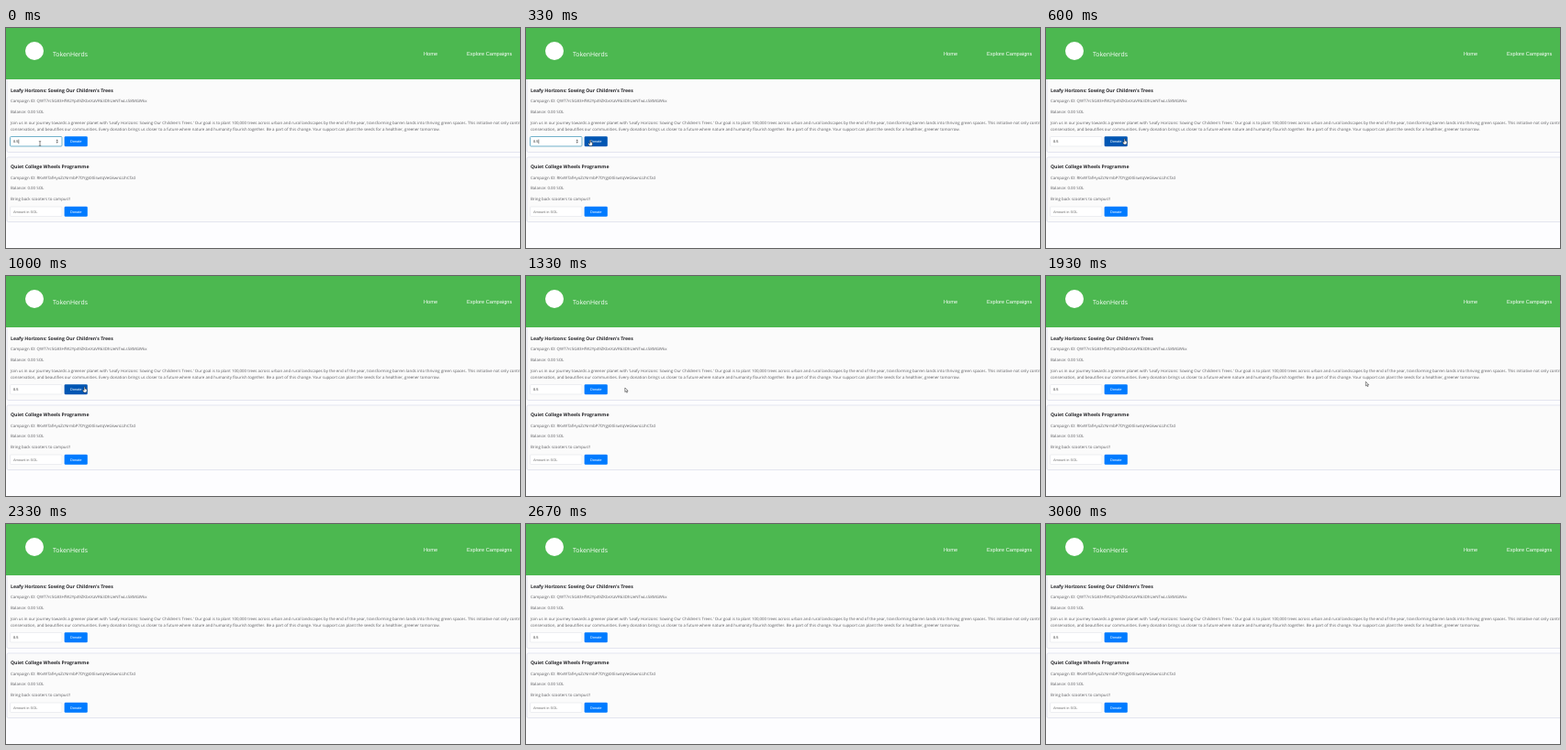
Write an HTML page that moves like this. It is 560 px wide and 240 px high and loops after 3070 ms.

```html
<!DOCTYPE html>
<html lang="en">
<head>
<meta charset="utf-8">
<title>Crowdfunding page</title>
<style>
  html, body { margin: 0; width: 100%; height: 100%; overflow: hidden; background: #fdfdff; }
  svg { display: block; width: 560px; height: 240px; }
  text { font: 4.4px "Open Sans", "Noto Sans", sans-serif; fill: #5c5c60; white-space: pre; text-rendering: geometricPrecision; }
  .title { font-size: 5.15px; font-weight: 700; fill: #26262a; }
  .brand { font-size: 6.85px; fill: #fff; }
  .nav { font: 5.65px "Liberation Sans", Arial, sans-serif; fill: #fff; }
  .control { font: 3.9px "Liberation Sans", Arial, sans-serif; fill: #707070; }
  .value { fill: #222; }
  .label { fill: #fff; text-anchor: middle; }
  .card { fill: #fbfbfb; stroke: #d9dcea; stroke-width: .7; }
  .field { fill: #fff; stroke: #e2e5ea; stroke-width: .6; }
  .field.focused { stroke: #62a9c4; stroke-width: .9; }
  .button { fill: #007bff; }
  .button.hovered { fill: #0056b3; }
</style>
</head>
<body>
<svg id="stage" viewBox="0 0 560 240" xmlns="http://www.w3.org/2000/svg"></svg>
<script>
const LOOP = 3070;
const STEP = 200 / 3;
const BLUR_AT = 520;
const EXIT_AT = 2260;
const stage = document.getElementById("stage");

// Pointer hot spot over time: [ms, x, y]
const path = [
  [0, 37, 126], [130, 37, 126], [430, 85.6, 121], [1130, 85.6, 121],
  [1330, 106.5, 122], [1930, 346.5, 115.5], [EXIT_AT, 530, 96]
];

function add(tag, attrs, parent = stage) {
  const node = document.createElementNS("http://www.w3.org/2000/svg", tag);
  for (const key in attrs) node.setAttribute(key, attrs[key]);
  parent.appendChild(node);
  return node;
}

function write(x, y, content, cls = "body") {
  add("text", { x, y, class: cls }).textContent = content;
}

function card(y, height) {
  add("rect", { x: 1, y, width: 570, height, rx: 1.5, class: "card" });
}

function donateForm(y, content, cls) {
  const field = add("rect", { x: 4.5, y, width: 56.5, height: 10.5, rx: 1, class: "field" });
  const button = add("rect", { x: 63.6, y: y - 0.2, width: 25.2, height: 10.9, rx: 1.3, class: "button" });
  write(8, y + 6.5, content, "control " + cls);
  write(76.2, y + 6.5, "Donate", "control label");
  return { field, button };
}

add("rect", { width: 560, height: 240, fill: "#fdfdff" });
card(54, 81.5);
card(141, 70.5);
add("rect", { width: 560, height: 56, fill: "#4cb850" });
add("circle", { cx: 31, cy: 25, r: 10, fill: "#fff" });
write(51, 30.8, "TokenHerds", "brand");
write(455, 30, "Home", "nav");
write(502, 30, "Explore Campaigns", "nav");

write(5, 69.5, "Leafy Horizons: Sowing Our Children's Trees", "title");
write(5, 80.7, "Campaign ID: QWT7rc5G83HfW2Yp49ZKbnXaVR63DhUeNTwLs58MGWkx");
write(5, 92.6, "Balance: 0.00 SOL");
write(5, 104.6, "Join us in our journey towards a greener planet with 'Leafy Horizons: Sowing Our Children's Trees.' " +
  "Our goal is to plant 100,000 trees across urban and rural landscapes by the end of the year, " +
  "transforming barren lands into thriving green spaces. This initiative not only contributes to");
write(5, 111.6, "conservation, and beautifies our communities. Every donation brings us closer to a future where " +
  "nature and humanity flourish together. Be a part of this change. Your support can plant the seeds " +
  "for a healthier, greener tomorrow.");
const form = donateForm(118.5, "0.5", "value");

write(5, 153.4, "Quiet College Wheels Programme", "title");
write(5, 164.7, "Campaign ID: RKvWTafHyoZcNrmbP7DYgJ4XEswtqVeGkwnLUhCfzd");
write(5, 176.4, "Balance: 0.00 SOL");
write(5, 188, "Bring back scooters to campus!!");
donateForm(195, "Amount in SOL", "placeholder");

// Editing marks shown while the first field has focus
const editing = add("g", {});
add("path", { d: "M13.8 121.5v4.8", stroke: "#222", "stroke-width": .5 }, editing);
add("path", { d: "M54.5 123.2l1.2-1.6 1.2 1.6zM54.5 124.2l1.2 1.6 1.2-1.6z", fill: "#555" }, editing);

const ink = { stroke: "#222", "stroke-width": .5, fill: "#fff", "stroke-linejoin": "round" };
const pointers = {
  beam: add("path", { ...ink, fill: "none", d: "M-1.2-2.3H1.2M0-2.3V2.3M-1.2 2.3H1.2" }),
  arrow: add("path", { ...ink, d: "M0 0V4.6L1.1 3.6 1.9 5.3 2.7 4.9 1.9 3.3H3.3Z" }),
  hand: add("path", { ...ink, d: "M-.5 0Q0-.5.5 0V2L2.5 2.6V4.6L1.8 6H-.8L-2.2 3.6-1.5 3.1-.5 3.9Z" })
};

function pointerAt(t) {
  const i = Math.max(1, path.findIndex(p => p[0] >= t));
  const [t0, x0, y0] = path[i - 1];
  const [t1, x1, y1] = path[i];
  const k = (t - t0) / (t1 - t0);
  return [x0 + (x1 - x0) * k, y0 + (y1 - y0) * k];
}

function render(time) {
  const t = Math.floor((time % LOOP) / STEP + 0.05) * STEP;
  const visible = t < EXIT_AT;
  const [x, y] = visible ? pointerAt(t) : [-20, -20];
  const hovered = x >= 64 && x <= 88.5;
  const focused = t < BLUR_AT;
  const active = hovered ? "hand" : x > 4 && x < 61 ? "beam" : "arrow";

  form.button.classList.toggle("hovered", hovered);
  form.field.classList.toggle("focused", focused);
  editing.setAttribute("visibility", focused ? "visible" : "hidden");
  for (const name in pointers) {
    pointers[name].setAttribute("visibility", visible && name === active ? "visible" : "hidden");
    pointers[name].setAttribute("transform", `translate(${x} ${y})`);
  }
}

const start = performance.now();
function tick() {
  render(performance.now() - start);
  requestAnimationFrame(tick);
}
tick();
</script>
</body>
</html>
```
